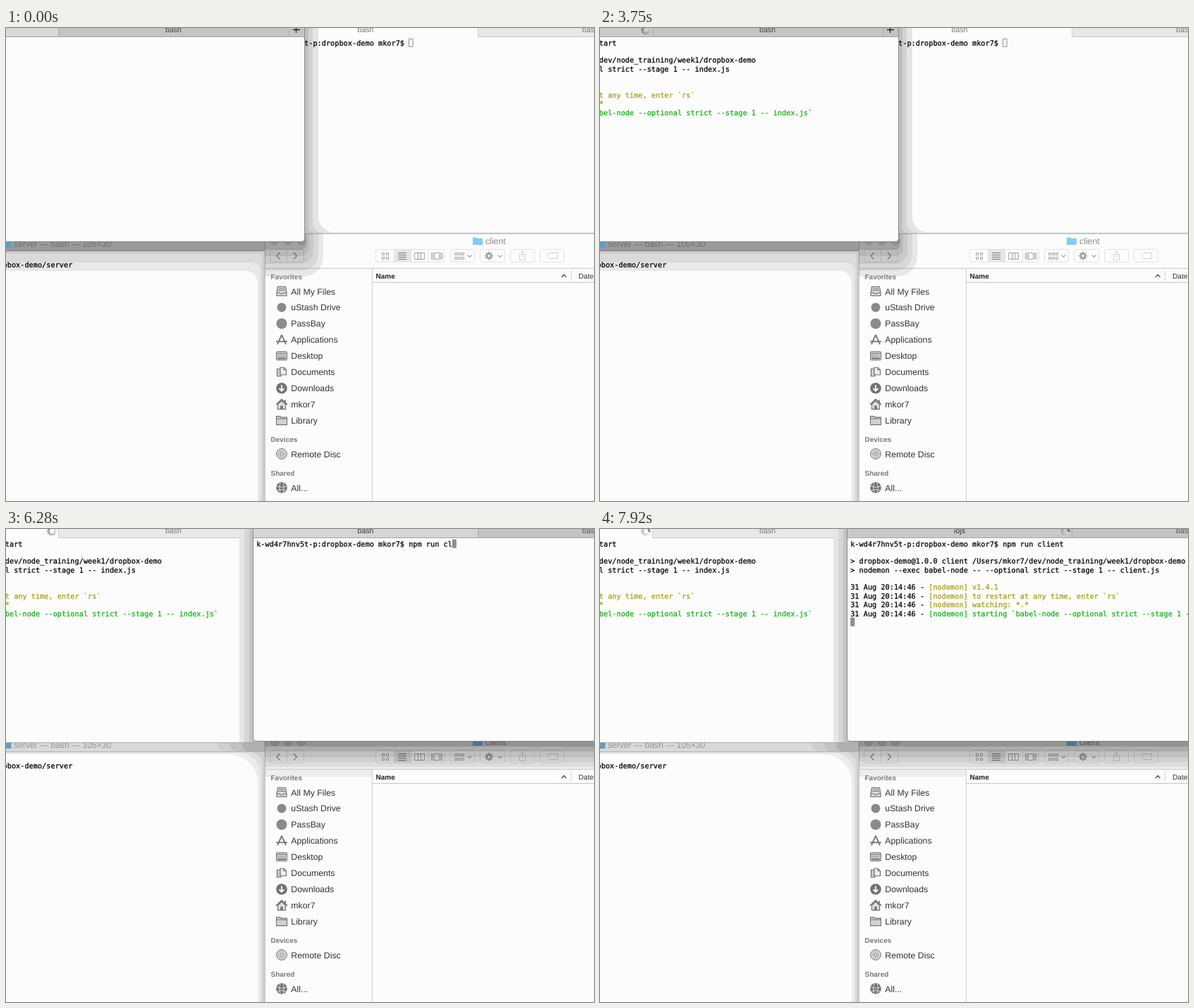
Animation of 834x672 px, one loop 8 s. Source, as an HTML page with a canvas:

```html
<!DOCTYPE html>
<html lang="en">
<head>
<meta charset="utf-8">
<title>Terminal demo</title>
<style>
html, body { margin: 0; width: 100%; height: 100%; overflow: hidden; background: #fcfcfc; }
canvas { display: block; }
</style>
</head>
<body>
<canvas id="stage" width="834" height="672"></canvas>
<script>
const c = document.getElementById('stage').getContext('2d');
c.textRendering = 'geometricPrecision';
const LOOP = 8000, SWITCH = 3900, STEP = 149, SPIN = 505;
const CW = 6.17, LH = 12.35;
const MONO = '10.25px "DejaVu Sans Mono", monospace';
const SANS = '"Liberation Sans", Arial, sans-serif';
const PAPER = '#fcfcfc', OLIVE = '#a8a010', GREEN = '#14b414', ICON = '#727272';
const PROMPT = 'k-wd4r7hnv5t-p:dropbox-demo mkor7$ ';

// drawing helpers
function rect(x, y, w, h, color) { c.fillStyle = color; c.fillRect(x, y, w, h); }
function round(x, y, w, h, r, color, stroke) {
  c.beginPath();
  c.roundRect(x, y, w, h, r);
  if (color) { c.fillStyle = color; c.fill(); }
  if (stroke) { c.strokeStyle = stroke; c.stroke(); }
}
function path(d, color, width = 1, fill) {
  const p = new Path2D(d);
  if (fill) { c.fillStyle = fill; c.fill(p); }
  if (color) { c.strokeStyle = color; c.lineWidth = width; c.stroke(p); c.lineWidth = 1; }
}
function disc(x, y, r, fill, stroke) {
  c.beginPath();
  c.arc(x, y, r, 0, 7);
  if (fill) { c.fillStyle = fill; c.fill(); }
  if (stroke) { c.strokeStyle = stroke; c.stroke(); }
}
function text(s, x, y, font, color, align = 'left') {
  c.font = font; c.fillStyle = color; c.textAlign = align;
  c.fillText(s, x, y);
}
function label(s, x, y, size, color, align, weight = '') {
  text(s, x, y, `${weight} ${size}px ${SANS}`, color, align);
}
// terminal text, slightly emboldened
function mono(s, x, y, color) {
  text(s, x, y, MONO, color);
  c.strokeStyle = color; c.lineWidth = .25;
  c.strokeText(s, x, y);
  c.lineWidth = 1;
}
function type(s, x, row, color = '#000') { mono(s, x, 24.7 + row * LH, color); }
function cursor(x, row) { rect(x, 14.8 + row * LH, 6, 12.3, '#8e8e8e'); }
function clipped(x, y, w, h, draw) {
  c.save();
  c.beginPath(); c.rect(x, y, w, h); c.clip();
  draw();
  c.restore();
}
function spinner(x, t) {
  const held = Math.floor(t / STEP) * STEP;
  const head = 2 + 12 * (held - SWITCH) / SPIN;
  for (let i = 0; i < 12; i++) {
    const a = i * Math.PI / 6, age = ((head - i) % 12 + 12) % 12;
    const dx = Math.cos(a), dy = Math.sin(a), g = 20 + age * 17;
    path(`M${x + dx * 3.4} ${3 + dy * 3.4}L${x + dx * 6.8} ${3 + dy * 6.8}`, `rgb(${g},${g},${g})`, 1.3);
  }
}

function server(rightFront) {
  rect(0, 303, 367, 14, rightFront ? '#d9d9d9' : '#9a9a9a');
  if (rightFront) {
    [[300, '#cfcfcf'], [318, '#c2c2c2'], [335, '#b0b0b0']].forEach(([x, col]) =>
      round(x, 300, 90, 17, [0, 0, 0, 12], col));
  }
  clipped(0, 304, 367, 13, () => {
    round(-6, 303, 13.5, 9, 1, '#5f9fc4');
    label('server — bash — 105×30', 11, 311, 12.1, rightFront ? '#969696' : '#707070');
  });
  rect(0, 316, 367, 1, rightFront ? '#b4b4b4' : '#7e7e7e');
  const bands = rightFront
    ? [[367, 317, 0, '#cecece'], [364, 317, 18, '#dedede'], [361, 318, 29, '#ececec'], [357, 320, 40, PAPER]]
    : [[367, 317, 0, '#cccccc'], [364, 320, 6, '#dadada'], [361, 333, 12, '#e8e8e8'], [357, 345, 17, PAPER]];
  for (const [right, y, r, col] of bands) round(-50, y, right + 50, 400, [0, r, 0, 0], col);
  mono('dropbox-demo/server', 94.3 - 19 * CW, 340.4, '#000');
}

// sidebar glyphs, drawn around 0,0
const glyphs = [
  () => { path('M-5.5 -6.5H5.5L7 2V6.5H-7V2Z', ICON, 1.2, '#d8d8d8'); path('M-7 2H-3Q-2 4 0 4T3 2H7M-4 -4H4M-5 -1.5H5', ICON, 1.2); },
  () => disc(0, 0, 6.5, '#8a8a8a'),
  () => disc(0, 0, 7.5, '#8a8a8a'),
  () => path('M0 -7L-6 6.5M0 -7L6 6.5M-8 2.5H8', ICON, 1.8),
  () => { round(-7.5, -6, 15, 12, 1, '#d0d0d0', ICON); path('M-7 -3.5H7', ICON); path('M-6 3.5H6', ICON, 2); c.setLineDash([1, 1]); path('M-6 0H6', '#999', 3); c.setLineDash([]); },
  () => { path('M-6.5 -4.5H-1V6H-6.5Z', ICON, 1.2, '#ccc'); path('M-2 -6.5H3L6.5 -3V4H-2ZM3 -6.5V-3H6.5', ICON, 1.2, '#eee'); },
  () => { disc(0, 0, 7.8, ICON); path('M0 -4.5V3.5M-3.5 .5L0 4L3.5 .5', '#fff', 1.8); },
  () => { path('M-5.5 0V7H5.5V0L0 -5Z', ICON, 1.2, '#ddd'); path('M-8 .5L0 -7L8 .5M5 -6.5V-3', ICON, 1.7); path('M-1.8 7V2H1.8V7Z', null, 0, ICON); },
  () => { path('M-7.5 6V-6H-2L-1 -4.5H7.5V6Z', ICON, 1.1, '#d2d2d2'); path('M-7 -2.5H7', ICON); },
  () => { disc(0, 0, 7.4, '#d8d8d8', ICON); disc(0, 0, 4.5, null, '#aaa'); disc(0, 0, 2, '#fff', ICON); },
  () => { disc(0, 0, 7.8, ICON); path('M-7 -2Q0 1 7 -2M-6 4Q0 1 6 4M-2 -7Q-5 0 -2 7M2 -7Q5 0 2 7', '#ddd'); }
];
const places = ['All My Files', 'uStash Drive', 'PassBay', 'Applications', 'Desktop',
  'Documents', 'Downloads', 'mkor7', 'Library', 'Remote Disc', 'All...'];

function toolbar() {
  const edge = '#e2e2e2', ink = '#a2a2a2', faint = '#d0d0d0';
  const button = (x, w) => round(x + .5, 314.5, w, 18, 2.5, PAPER, edge);
  button(374, 48); button(524, 98); button(630, 34); button(672, 35); button(715, 34); button(757, 34);
  rect(551, 315, 24, 18, '#e6e6e6');
  for (const x of [398, 550, 574, 599]) rect(x, 315, 1, 18, edge);
  path('M388.5 319L384 323.8L388.5 328.5M408 319L412.5 323.8L408 328.5', '#8c8c8c', 1.2);
  for (const x of [533.5, 539.5]) for (const y of [319.5, 325.5]) round(x, y, 3, 3, 0, null, ink);
  for (let i = 0; i < 4; i++) rect(556, 319 + i * 3, 12, 1, '#777');
  path('M579.5 319.5H593.5V328.5H579.5ZM584.5 319V328M588.5 319V328', ink);
  path('M607.5 319.5H614.5V328.5H607.5ZM603.5 319V329M605.5 319V329M616.5 319V329M618.5 319V329', ink);
  for (let i = 0; i < 6; i++) round(636.5 + i % 3 * 5, i < 3 ? 319.5 : 325.5, 3, 3, 0, null, ink);
  path('M654.5 322.5L657.5 325.5L660.5 322.5M697.5 322.5L700.5 325.5L703.5 322.5', ink, 1.2);
  disc(685, 323.7, 4.3, ink);
  for (let i = 0; i < 4; i++) {
    const a = i * Math.PI / 4, dx = 6 * Math.cos(a), dy = 6 * Math.sin(a);
    path(`M${685 - dx} ${323.7 - dy}L${685 + dx} ${323.7 + dy}`, ink, 1.8);
  }
  disc(685, 323.7, 1.8, PAPER);
  path('M731 321.5H728.5V329.5H736.5V321.5H734M732.5 326V317M730 319.5L732.5 317L735 319.5', faint);
  path('M767.5 323.5L771 319.5H782.5V327.5H771Z', faint);
}

function finder(rightFront) {
  rect(367, 292, 467, 380, PAPER);
  rect(367, 292, 1, 380, '#c4c4c4');
  rect(367, 292, 467, 1, '#c8c8c8');
  for (const x of [381, 400, 419]) disc(x, 302, 6, '#dedede', '#cecece');
  path('M662 308V297.5H667L668.5 299H676V308Z', null, 0, '#7fcdf2');
  label('client', 680, 307, 12.3, '#8a8a8a');
  toolbar();
  rect(367, 341, 467, 1, '#c8c8c8');
  rect(519, 341, 1, 331, '#cdcdcd');
  rect(520, 361, 314, 1, '#c6c6c6');
  rect(801, 344, 1, 15, '#d4d4d4');
  label('Name', 524.5, 355.6, 10, '#222', 'left', 'bold');
  label('Date Modified', 812, 355.6, 10.2, '#333');
  path('M788 354L791.2 350.5L794.5 354', '#444', 1.2);

  // shadow of the front window
  clipped(367, 292, 467, 70, () => {
    if (rightFront) {
      rect(367, 342, 152, 10, 'rgba(0,0,0,.06)');
      [[341, .06], [338, .07], [331, .06], [324, .08], [316, .1], [309, .15]].forEach(([y, a]) =>
        rect(367, 292, 467, y - 292, `rgba(0,0,0,${a})`));
    } else {
      [[450, 353, 28, .08], [443, 345, 24, .07], [436, 335, 18, .07], [430, 324, 12, .08], [426, 315, 8, .13]]
        .forEach(([x, y, r, a]) => round(300, 200, x - 300, y - 200, r, `rgba(0,0,0,${a})`));
    }
  });

  [['Favorites', 357.4], ['Devices', 588.4], ['Shared', 636]].forEach(([s, y]) =>
    label(s, 375.5, y, 10, '#787878', 'left', 'bold'));
  places.forEach((name, i) => {
    const y = i < 9 ? 374 + i * 22.95 : i < 10 ? 605 : 653;
    c.save(); c.translate(391, y); glyphs[i](); c.restore();
    label(name, 404.3, y + 4.5, 12.3, '#333');
  });
}

function leftWindow(rightFront, t) {
  if (rightFront) {
    rect(0, 0, 351, 303, PAPER);
    rect(74, 0, 277, 12, '#e9e9e9');
    rect(74, 12, 277, 1, '#c8c8c8');
    rect(74, 0, 1, 12, '#cfcfcf');
    [[331, '#e6e6e6'], [338, '#d6d6d6'], [345, '#c4c4c4']].forEach(([x, col]) => rect(x, 0, 351 - x, 303, col));
    rect(0, 303, 351, 1, '#a8a8a8');
  } else {
    round(-20, -20, 443.5, 323.5, 4, PAPER, '#8a8a8a');
    rect(0, 0, 74, 12, t < 2100 ? '#d8d8d8' : '#cbcbcb');
    rect(74, 0, 349, 12, '#c4c4c4');
    rect(74, 0, 1, 12, '#a8a8a8');
    rect(401, 0, 1, 12, '#b0b0b0');
    rect(0, 12, 423, 1, '#a2a2a2');
    path('M407 2.5H417M411.5 0V7', '#222', 1.3);
  }
  label('bash', 237.5, 6, 10.6, rightFront ? '#777' : '#444', 'center');
  const x = -1.2;
  if (t >= 150 && t < 600) cursor(x, 0);
  if (t >= 600) type('tart', x, 0);
  if (t >= 600 && t < 1800) cursor(x + 4 * CW, 0);
  if (t >= 2100) spinner(65, t);
  if (t >= 2550) {
    type('dev/node_training/week1/dropbox-demo', x, 2);
    type('l strict --stage 1 -- index.js', x, 3);
  }
  if (t >= 2850) {
    type('t any time, enter `rs`', x, 6, OLIVE);
    type('*', x, 7, OLIVE);
    type('bel-node --optional strict --stage 1 -- index.js`', x, 8, GREEN);
  }
}

function nodemon(x) {
  ['v1.4.1', 'to restart at any time, enter `rs`', 'watching: *.*',
    'starting `babel-node --optional strict --stage 1 -- client.js`'].forEach((s, i) => {
    type('31 Aug 20:14:46 -', x, 5 + i);
    type('[nodemon] ' + s, x + 18 * CW, 5 + i, i < 3 ? OLIVE : GREEN);
  });
}

function rightWindow(front, t) {
  const x = 355.2;
  if (front) {
    round(350.5, -20, 520, 321.5, 4, PAPER, '#868686');
    rect(351, 0, 318, 12, t < 7320 ? '#d5d5d5' : '#c8c8c8');
    rect(669, 0, 165, 12, '#c4c4c4');
    rect(669, 0, 1, 12, '#a8a8a8');
    rect(351, 12, 483, 1, '#a6a6a6');
  } else {
    rect(423, 0, 411, 292, '#c0c0c0');
    [[429, 8, '#d2d2d2'], [435, 15, '#e5e5e5'], [443, 23, PAPER]].forEach(([left, r, col], i) =>
      round(left, -30, 450, 321.5 - i * .5, [0, 0, 0, r], col));
    rect(669, 0, 165, 12, '#e8e8e8');
    rect(669, 0, 1, 12, '#cfcfcf');
    rect(669, 12, 165, 1, '#c8c8c8');
  }
  label(t < 6870 ? 'bash' : 'iojs', 510, 6, 10.6, front ? '#333' : '#777', 'center');
  label('bash', 817, 6, 10.6, front ? '#555' : '#777');

  let cmd = '';
  if (t >= 4490 && t < 5530) cmd = 'clear'.slice(0, Math.floor((t - 4490) / 148));
  if (t >= 5530) cmd = 'npm run client'.slice(0, 2 * Math.floor((t - 5530) / 148));
  type(PROMPT + cmd, x, 0);
  if (!front) round(571.5, 15.5, 5.5, 11, 0, null, '#8e8e8e');
  else if (t < 6720) cursor(x + (PROMPT.length + cmd.length) * CW, 0);
  else cursor(x, t < 7320 ? 1 : t < 7620 ? 4 : 9);
  if (t >= 7320) {
    spinner(660, t);
    type('> dropbox-demo@1.0.0 client /Users/mkor7/dev/node_training/week1/dropbox-demo', x, 2);
    type('> nodemon --exec babel-node -- --optional strict --stage 1 -- client.js', x, 3);
  }
  if (t >= 7620) nodemon(x);
}

function frame(now) {
  const t = now % LOOP, rightFront = t >= SWITCH;
  server(rightFront);
  if (rightFront) {
    finder(true);
    leftWindow(true, t);
    rightWindow(true, t);
  } else {
    rightWindow(false, t);
    finder(false);
    leftWindow(false, t);
  }
}

const start = performance.now();
(function tick() {
  frame(performance.now() - start);
  requestAnimationFrame(tick);
})();
</script>
</body>
</html>
```
